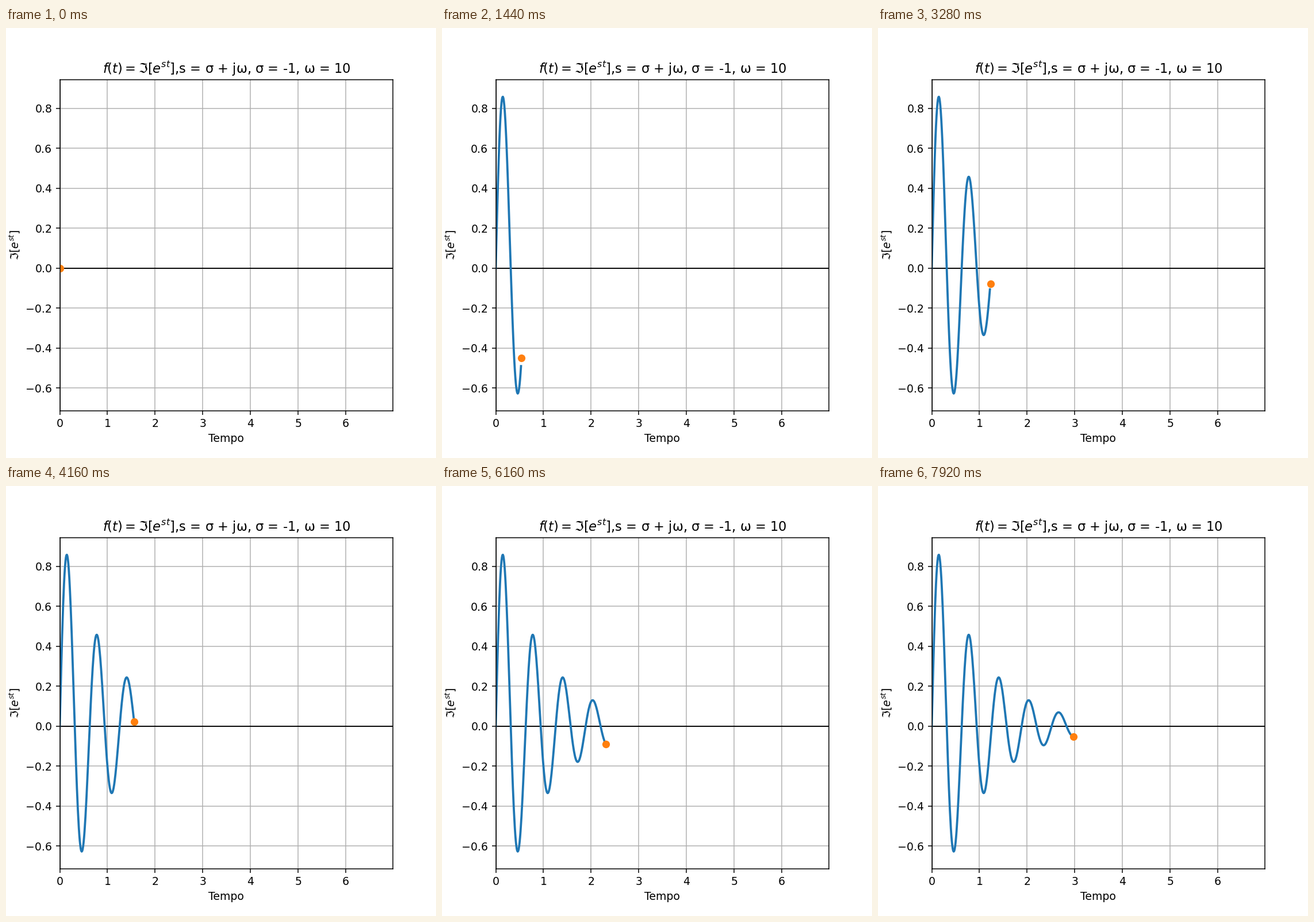
Write a matplotlib script that moves like this. It is 748 px wide and 748 px high and loops after 8 s.

```python
import numpy as np
import matplotlib.pyplot as plt
from matplotlib.animation import FuncAnimation

SIGMA, OMEGA = -1, 10
STRIDE = 3  # samples advanced per frame
FRAMES, INTERVAL = 100, 80

t = np.arange(0, 7, 0.01)
f = np.exp((SIGMA + 1j * OMEGA) * t).imag

fig, ax = plt.subplots(figsize=(5.5, 5.5), dpi=136)
margin = 0.1 * f.max()
ax.set_xlim(0, t[-1])
ax.set_ylim(f.min() - margin, f.max() + margin)
ax.set_title(rf"$f(t) = \Im[e^{{st}}]$,s = σ + jω, σ = {SIGMA}, ω = {OMEGA}")
ax.set_xlabel("Tempo")
ax.set_ylabel(r"$\Im[e^{st}]$")
ax.grid(True)
ax.axhline(0, color="black", lw=1)
ax.axvline(0, color="black", lw=1)

curve, = ax.plot([], [], color="C0", lw=2)
dot, = ax.plot([], [], "o", color="C1")


def update(frame):
    i = frame * STRIDE
    curve.set_data(t[:i], f[:i])
    dot.set_data([t[i]], [f[i]])
    return curve, dot


anim = FuncAnimation(fig, update, frames=FRAMES, interval=INTERVAL,
                     init_func=lambda: update(0), repeat=True, repeat_delay=0)
plt.show()
```
